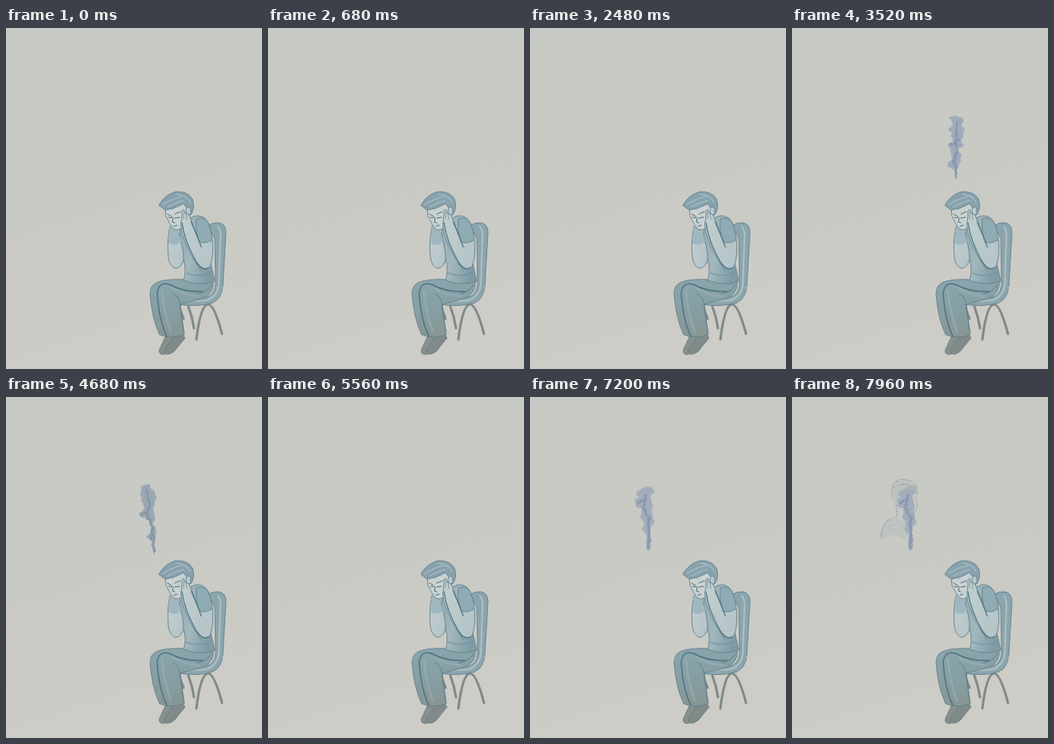
Animation of 320x427 px, one loop 8 s. Source, as an HTML page:

```html
<!DOCTYPE html>
<html lang="en">
<head>
<meta charset="utf-8">
<title>Seated figure</title>
<style>
  html, body { margin: 0; width: 100%; height: 100%; overflow: hidden; background: #c9cac4; }
  svg { display: block; width: 100vw; height: 100vh; }
  .line { fill: none; stroke-linecap: round; stroke-linejoin: round; }
</style>
</head>
<body>
<svg viewBox="0 0 320 427">
  <defs>
    <linearGradient id="paper" x2=".25" y2="1">
      <stop stop-color="#c7c9c4"/><stop offset=".6" stop-color="#c9cac4"/><stop offset="1" stop-color="#cdccc6"/>
    </linearGradient>
    <linearGradient id="shirt" x2="1" y2=".5">
      <stop stop-color="#8fa8b0"/><stop offset=".5" stop-color="#a3b8bd"/><stop offset="1" stop-color="#7f9ba5"/>
    </linearGradient>
    <linearGradient id="pants" x2=".15" y2="1">
      <stop stop-color="#8ba5ad"/><stop offset=".5" stop-color="#869fa5"/><stop offset="1" stop-color="#879695"/>
    </linearGradient>
    <linearGradient id="skin" x2="1" y2="1">
      <stop stop-color="#c3cfd0"/><stop offset="1" stop-color="#b3c3c7"/>
    </linearGradient>
    <filter id="pencil" x="-5%" y="-5%" width="110%" height="110%" color-interpolation-filters="sRGB">
      <feTurbulence type="fractalNoise" baseFrequency=".3" numOctaves="2" seed="4" result="n"/>
      <feDisplacementMap in="SourceGraphic" in2="n" scale="1.6" xChannelSelector="R" yChannelSelector="G"/>
      <feGaussianBlur stdDeviation=".35"/>
    </filter>
  </defs>
  <rect width="320" height="427" fill="url(#paper)"/>

  <g id="ink"></g>

  <g filter="url(#pencil)" stroke="#64828d" stroke-width=".9" stroke-linejoin="round">
    <!-- chair -->
    <g class="line" stroke="#7f8988" stroke-width="3">
      <path d="M216 349L222 364M228 349Q233 362 235 376"/>
      <path d="M238 390Q243 348 252 346Q260 345 270 383"/>
    </g>
    <path d="M253 247Q259 243 267 244Q275 246 275 256L271 324Q269 339 259 344Q239 350 215 346L215 338L250 337Q260 335 262 322L261 264Z" fill="#8ca5ad"/>
    <path class="line" d="M265 249Q269 253 268 265L266 322Q264 336 251 341L221 343" stroke="#adc0c5" stroke-width="2"/>

    <!-- shoes and trousers -->
    <path d="M200 385L192 402Q190 408 196 409L203 407L216 389Z" fill="#85908f" stroke="#707f81"/>
    <path d="M209 386L198 403Q197 410 205 408Q211 406 215 399L224 388L220 383Z" fill="#7f8a89" stroke="#707f81"/>
    <path d="M222 315Q205 314 193 317Q180 320 180 332Q182 363 192 384Q205 390 223 384L217 346Q235 342 247 338Q261 331 259 316Z" fill="url(#pants)"/>
    <path class="line" d="M246 330Q222 331 204 321Q191 317 189 332Q191 365 201 386" stroke="#4c7480" stroke-width="1.5"/>
    <path class="line" d="M209 333Q215 335 218 346L222 380M239 333Q252 331 257 321" stroke="#587b85"/>
    <path class="line" d="M195 329Q197 356 206 380M207 325Q222 335 241 336" stroke="#a0b3b6" stroke-width="3" opacity=".45"/>

    <!-- torso -->
    <path d="M217 251Q226 237 239 235Q250 235 254 247L258 268L255 291L261 317Q243 324 222 316Q226 304 222 290L217 268Z" fill="url(#shirt)"/>
    <path class="line" d="M226 259Q231 285 244 304M226 307Q239 313 256 306" stroke="#7093a0" stroke-width="2" opacity=".6"/>

    <!-- far arm -->
    <path d="M205 248Q201 266 203 288Q205 299 212 301Q220 300 222 289Q222 273 214 253Z" fill="url(#skin)"/>
    <path d="M205 248L203 269Q212 275 219 267L214 252Z" fill="#a0b7bf" stroke="none"/>

    <!-- head -->
    <path d="M199 225L200 236L206 247Q210 255 217 252L225 244L232 230L225 218Z" fill="#c9d2d1"/>
    <path d="M191 222Q198 209 212 205Q227 204 233 214Q237 225 231 234L227 227L222 220Q210 227 199 228Z" fill="#88a2ad"/>
    <path class="line" d="M196 221Q207 214 220 211M202 224Q213 218 222 216M213 208Q225 209 230 218" stroke="#acc1c7" stroke-width="1.1"/>
    <path class="line" d="M202 233L207 236M211 233L218 230M203 237Q206 239 208 237M211 238L217 237M209 238L208 243L211 244M210 248L214 247" stroke="#506975" stroke-width="1"/>
    <ellipse cx="228" cy="229" rx="3" ry="5" fill="#b9c8ca"/>

    <!-- near arm -->
    <path d="M220 235Q219 228 222 227L224 232L227 233Q231 236 232 245L242 267L258 265Q260 286 255 299Q249 306 240 297Q229 284 220 257Q217 246 220 235Z" fill="url(#skin)"/>
    <path d="M238 239Q248 235 253 244Q257 254 258 265Q249 271 242 268Q236 255 238 239Z" fill="#8fabb4"/>
    <path class="line" d="M220 244Q223 267 238 293Q246 305 253 300M232 243Q238 258 244 274" stroke="#527b88" stroke-width="1.4"/>
    <path class="line" d="M222 230L222 239M225 232L226 240" stroke="#718e99" stroke-width=".8"/>
  </g>
</svg>
<script>
const LOOP = 8000;
const NS = "http://www.w3.org/2000/svg";
const ink = document.getElementById("ink");
const clamp = v => Math.max(0, Math.min(1, v));
const ease = v => { v = clamp(v); return v * v * (3 - 2 * v); };

// Each wash: fill, outline, inner strokes, fade-in and fade-out windows.
const washes = [
  { color: "#8ba4b3", shade: "#668ba3", on: [650, 1250], off: [1500, 2350],
    body: "M206 107L212 108L211 123L216 128L214 144L218 158L213 172L216 179L210 183L211 195L208 194L207 184L198 181L206 176L196 159L191 151L195 148L190 137L183 132L184 127L194 126L198 140L202 145L198 126L201 120Z",
    marks: "M187 130L207 173M209 112L206 140L212 169M200 179L216 177M209 176L209 193M198 152L208 174" },
  { color: "#9ca8ba", shade: "#7789a8", on: [2650, 3400], off: [3680, 4220],
    body: "M197 112L205 109L214 114L212 124L216 129L212 141L215 146L209 152L212 164L208 173L206 191L203 177L195 174L194 170L200 164L198 152L194 147L201 142L199 131L195 127L202 121Z",
    marks: "M207 118L204 143L207 154L201 168M209 140L198 147M204 167L205 187" },
  { color: "#96a5b0", shade: "#748c9f", on: [4080, 4580], off: [4950, 5700],
    body: "M169 111L179 109L185 119L188 126L184 139L186 151L184 159L188 168L185 180L187 198L183 193L182 180L176 176L181 167L178 154L168 150L167 144L173 141L171 133L168 122Z",
    marks: "M175 116L180 135L176 145L183 163L181 177M185 174L185 193M170 147L176 144" },
  { color: "#a0aabb", shade: "#7b8ba8", on: [5700, 6380],
    body: "M133 118L142 114L154 112L155 119L151 125L153 137L152 148L156 154L151 163L151 190L147 194L145 187L146 174L140 165L143 158L138 151L140 140L132 137L130 128L136 126Z",
    marks: "M145 122L142 139L148 153L147 163M149 150L148 190M135 133L145 128" },
  { color: "#abb6bb", shade: "#8a9ba3", on: [6700, 8300], ghost: true,
    body: "M125 118Q124 105 137 102Q151 101 157 113L154 120Q142 116 134 123L133 143L132 153L145 158L143 179L126 172L113 179L110 173Q111 156 130 152L131 138L126 131Z",
    marks: "M125 125Q122 105 139 103Q155 104 157 119L154 126L157 135L153 146L146 149M130 132L131 150Q112 153 111 177M128 114Q140 104 155 115M132 123Q143 114 155 121" }
];

function add(parent, tag, attrs) {
  const el = document.createElementNS(NS, tag);
  for (const key in attrs) el.setAttribute(key, attrs[key]);
  return parent.appendChild(el);
}

washes.forEach((w, i) => {
  const filter = add(ink, "filter", {
    id: "wash" + i, x: "-10%", y: "-10%", width: "120%", height: "120%",
    "color-interpolation-filters": "sRGB"
  });
  add(filter, "feTurbulence", {
    type: "fractalNoise", baseFrequency: w.ghost ? .65 : .18, numOctaves: 2, seed: i + 3, result: "n"
  });
  add(filter, "feDisplacementMap", {
    in: "SourceGraphic", in2: "n", scale: w.ghost ? 1 : 4,
    xChannelSelector: "R", yChannelSelector: "G", result: "rough"
  });
  w.mask = add(filter, "feColorMatrix", { in: "n", type: "matrix", result: "grain" });
  add(filter, "feComposite", { in: "rough", in2: "grain", operator: "in" });
  add(filter, "feGaussianBlur", { stdDeviation: .35 });

  w.group = add(ink, "g", { filter: `url(#wash${i})` });
  add(w.group, "path", { d: w.body, fill: w.color, opacity: w.ghost ? .55 : .9 });
  add(w.group, "path", {
    d: w.marks, class: "line", stroke: w.shade,
    "stroke-width": w.ghost ? 1.1 : 2.8, opacity: w.ghost ? .8 : .6
  });
});

function draw(t) {
  for (const w of washes) {
    const span = ([a, b]) => ease((t - a) / (b - a));
    const amount = span(w.on) * (w.off ? 1 - span(w.off) : 1);
    w.group.style.display = amount > .005 ? "" : "none";
    w.group.setAttribute("opacity", Math.min(1, amount * 1.5).toFixed(3));
    const cut = (-4.6 + 4.6 * (w.ghost ? amount * .6 : amount)).toFixed(3);
    w.mask.setAttribute("values", `0 0 0 0 0 0 0 0 0 0 0 0 0 0 0 6 0 0 0 ${cut}`);
  }
}

const start = performance.now();
function tick() {
  draw((performance.now() - start) % LOOP);
  requestAnimationFrame(tick);
}
tick();
</script>
</body>
</html>
```
